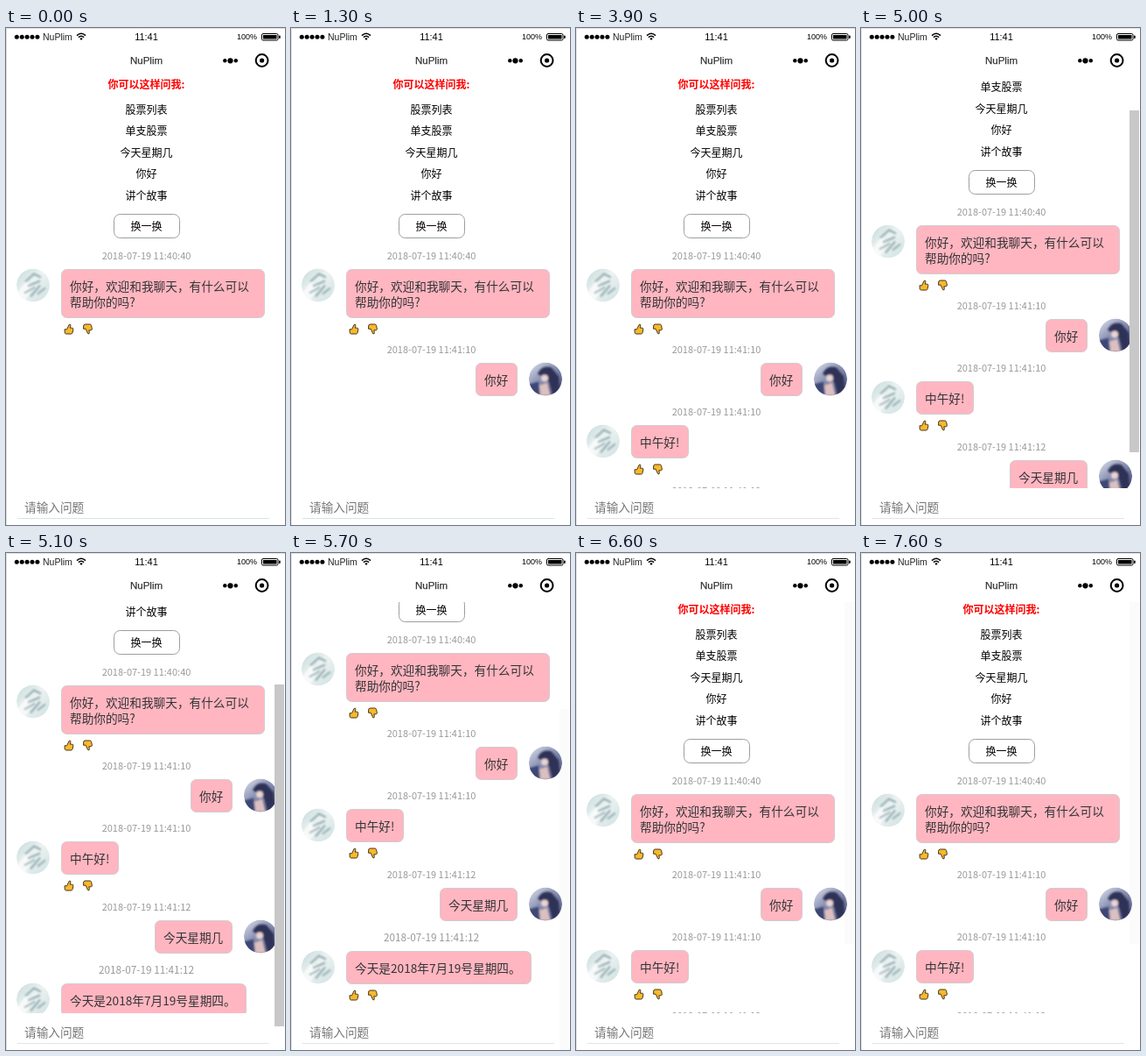
Write an HTML page that moves like this. It is 319 by 567 pixels and loops after 8 s.

```html
<!DOCTYPE html>
<html lang="zh">
<head>
<meta charset="utf-8">
<style>
  html, body { margin: 0; width: 100%; height: 100%; overflow: hidden; background: #fff; }
  svg { display: block; width: 319px; height: 567px; }
  text { font-family: "Noto Sans CJK SC", "Noto Sans CJK", sans-serif; }
  .latin { font-family: "Liberation Sans", Arial, sans-serif; }
</style>
</head>
<body>
<svg viewBox="0 0 319 567">
  <defs>
    <clipPath id="disc"><circle r="19"/></clipPath>
    <filter id="soft"><feGaussianBlur stdDeviation="1"/></filter>
    <linearGradient id="ice" x2="1" y2="1">
      <stop stop-color="#c3d9da"/><stop offset=".45" stop-color="#edf3f2"/><stop offset="1" stop-color="#cfe0e1"/>
    </linearGradient>
    <linearGradient id="dusk" x2=".8" y2="1">
      <stop stop-color="#dfe3ef"/><stop offset=".45" stop-color="#8f96b6"/><stop offset="1" stop-color="#424a78"/>
    </linearGradient>
    <g id="bot" clip-path="url(#disc)">
      <circle r="19" fill="url(#ice)"/>
      <g filter="url(#soft)" fill="none" stroke="#8fa9ae" stroke-width="2">
        <path d="M-19 10L-8-4 0 0-10 19H-19Z" fill="#f8faf9" stroke="none"/>
        <path d="M-9-4L1-13 9-9M-6 1L8-5M-10 9L2 2M-3 13L8 0M5 10L14 3"/>
      </g>
    </g>
    <g id="me" clip-path="url(#disc)">
      <circle r="19" fill="url(#dusk)"/>
      <g filter="url(#soft)">
        <path d="M-19 6L-8 3-6 19H-19Z" fill="#3d4674"/>
        <path d="M-9-6Q-4-17 7-13L15-3 16 10 9 19 4 3Z" fill="#2e3157"/>
        <ellipse cx="-1" cy="-1" rx="4" ry="4" fill="#e9d3d3"/>
        <path d="M-7 7L2 4 6 19H-6Z" fill="#dcbfc0"/>
      </g>
    </g>
    <path id="thumb" d="M-5 .3H-2.4L.2-5.2Q1.9-6 1.9-4L1.3-1.3H3.8Q5.2-1 4.8.6L4 4.3Q3.6 5.5 2.4 5.5H-3.3L-4.7 4.6Z"
      fill="#fbb82c" stroke="#44371c" stroke-linejoin="round"/>
  </defs>

  <rect width="319" height="567" fill="#fff"/>
  <g id="page"></g>

  <rect width="319" height="56" fill="#fff"/>
  <rect y="525" width="319" height="42" fill="#fff"/>
  <g id="chrome">
    <path d="M.5 0V567M0 .5H319" stroke="#dedede"/>
    <path d="M81 8.6Q86 4 91 8.6M82.9 10.6Q86 7.8 89.1 10.6" fill="none" stroke="#000" stroke-width="1.5"/>
    <path d="M84.3 12Q86 10.6 87.7 12L86 13.9Z"/>
    <rect x="292.5" y="6.5" width="18.5" height="7.5" rx="1.5" fill="none" stroke="#000"/>
    <rect x="294" y="8" width="15.5" height="4.5"/>
    <rect x="312" y="8.5" width="1.7" height="3.5" rx=".8"/>
    <circle cx="250.3" cy="37.3" r="2.2"/><circle cx="256.5" cy="37.3" r="3.1"/><circle cx="262.8" cy="37.3" r="2.2"/>
    <circle cx="292.6" cy="37" r="6.9" fill="none" stroke="#000" stroke-width="2"/><circle cx="292.6" cy="37" r="2.6"/>
  </g>
  <path id="line" d="M13 559.5H301"/>
  <rect id="bar" x="307" width="11" height="390" fill="#c8c8c8"/>
</svg>
<script>
const $ = id => document.getElementById(id);
const page = $('page'), chrome = $('chrome');

function add(parent, tag, attrs, content) {
  const el = document.createElementNS('http://www.w3.org/2000/svg', tag);
  for (const k in attrs) el.setAttribute(k, attrs[k]);
  if (content) el.textContent = content;
  return parent.appendChild(el);
}

// cy is the middle of the line
function label(parent, str, x, cy, size, fill, more) {
  return add(parent, 'text', { x, y: cy + size * .38, 'font-size': size, fill, ...more }, str);
}
const centre = { 'text-anchor': 'middle' };

function message(stampY, time, mine, width, lines, stampSize = 11) {
  const g = add(page, 'g', {}), top = stampY + 15.5;
  const left = mine ? 258.5 - width : 63.5;
  label(g, '2018-07-19 ' + time, 160.5, stampY, stampSize, '#999', centre);
  add(g, 'rect', { x: left, y: top, width, height: 19 + 18 * lines.length, rx: 6, fill: '#ffb6c1', stroke: '#d0cccf' });
  lines.forEach((s, i) => label(g, s, left + 9.5, top + 19 + 18 * i, 13.67, '#333'));
  add(g, 'use', { href: mine ? '#me' : '#bot', transform: `translate(${mine ? 291 : 31} ${top + 18})` });
  if (!mine) {
    const y = top + 32 + 18 * lines.length;
    add(g, 'use', { href: '#thumb', transform: `translate(72 ${y})` });
    add(g, 'use', { href: '#thumb', transform: `translate(93.5 ${y}) scale(1 -1)` });
  }
  return g;
}

label(page, '你可以这样问我:', 160.5, 64, 12, '#f00', { ...centre, 'font-weight': 700 });
['股票列表', '单支股票', '今天星期几', '你好', '讲个故事'].forEach((s, i) =>
  label(page, s, 160.5, 93 + 24.6 * i, 12, '#000', centre));
add(page, 'rect', { x: 123.5, y: 212.5, width: 75, height: 27, rx: 7, fill: '#fff', stroke: '#9a9fa3' });
label(page, '换一换', 160.5, 226.3, 12, '#000', centre);

const shownAt = [0, 1300, 1500, 3200, 3900];
const messages = [
  message(260, '11:40:40', false, 232, ['你好，欢迎和我聊天，有什么可以', '帮助你的吗?']),
  message(367, '11:41:10', true, 47, ['你好']),
  message(438, '11:41:10', false, 65, ['中午好!']),
  message(528, '11:41:12', true, 88, ['今天星期几']),
  message(600, '11:41:12', false, 211, ['今天是2018年7月19号星期四。'], 11.8)
];

for (let i = 0; i < 5; i++) add(chrome, 'circle', { cx: 12.3 + 5.9 * i, cy: 10.3, r: 2.5 });
const latin = { class: 'latin' };
label(chrome, 'NuPlim', 42, 9.7, 10.5, '#222', latin);
label(chrome, '11:41', 160.5, 9.7, 11, '#000', { ...latin, ...centre });
label(chrome, '100%', 264, 10, 9, '#000', latin);
label(chrome, 'NuPlim', 160.5, 36.5, 11.5, '#333', { ...latin, ...centre, stroke: '#333', 'stroke-width': .25 });
label(chrome, '请输入问题', 21, 547.3, 13.67, '#777');

// value of the last step reached
const step = (t, steps) => steps.reduce((v, [at, next]) => t >= at ? next : v, 0);
const scrollSteps = [[5000, 50], [5100, 124], [5200, 161], [6000, 70], [6100, 0]];
const fade = at => [[at, .65], [at + 100, .3], [at + 200, .08]];
const barSteps = [[5000, 1], ...fade(5500), [6000, 1], ...fade(6400)];

function draw(now) {
  const t = now % 8000, scroll = step(t, scrollSteps);
  messages.forEach((m, i) => m.setAttribute('visibility', t >= shownAt[i] ? 'visible' : 'hidden'));
  page.setAttribute('transform', `translate(0 ${-scroll})`);
  $('bar').setAttribute('y', Math.round(56 + scroll * 122 / 161));
  $('bar').setAttribute('opacity', step(t, barSteps));
  $('line').setAttribute('stroke', t < 2000 ? '#d3e6e3' : '#e2e4e4');
}

const start = performance.now();
function loop() {
  draw(performance.now() - start);
  requestAnimationFrame(loop);
}
loop();
</script>
</body>
</html>
```
